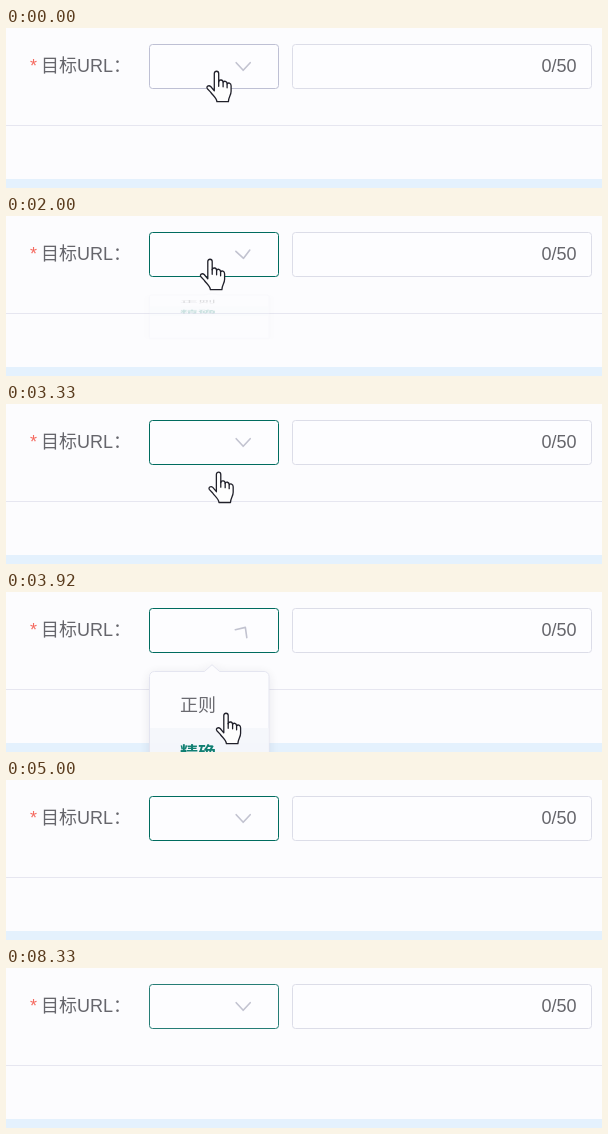
An HTML page for the animation above (8.41 s loop, 596 px wide and 160 px high).

```html
<!DOCTYPE html>
<html lang="zh-CN">
<head>
<meta charset="utf-8">
<title>目标URL</title>
<style>
  html, body { margin: 0; width: 100%; height: 100%; overflow: hidden; background: #fcfcfe; }
  svg { display: block; width: 596px; height: 160px; }
  text { font: 18px "Liberation Sans", "Noto Sans CJK SC", "Noto Sans CJK", sans-serif; fill: #66666c; }
  .box { fill: #fdfdff; stroke: #dcdde8; }
  .selected { font-weight: 700; fill: #0a7c6e; }
  #panel { filter: drop-shadow(0 2px 6px rgba(0, 0, 20, .09)); }
  #chevron { fill: none; stroke: #c2c3d0; stroke-width: 1.6; stroke-linecap: round; stroke-linejoin: round; }
  #hand { fill: #fefefe; stroke: #20202a; stroke-width: 1.3; stroke-linejoin: round; stroke-linecap: round; }
</style>
</head>
<body>
<svg viewBox="0 0 596 160">
  <rect width="596" height="160" fill="#fcfcfe"/>
  <rect y="97" width="596" height="1" fill="#e6e6f0"/>
  <rect y="151" width="596" height="9" fill="#e4f1fd"/>

  <text x="24" y="44" style="fill:#f56a60">*</text>
  <text x="35" y="44">目标URL：</text>

  <rect id="select" class="box" x="143.5" y="16.5" width="129" height="44" rx="3"/>
  <rect class="box" x="286.5" y="16.5" width="299" height="44" rx="3"/>
  <text x="570.5" y="44" text-anchor="end">0/50</text>
  <path id="chevron" d="M-7 3.8L0 -3.8L7 3.8"/>

  <g id="popup">
    <path id="panel" fill="#fdfdff" stroke="#e4e5f0"
      d="M148.500 79.500H198.500L206 72.500L213.500 79.500H258a5 5 0 0 1 5 5V300H143.500V84.500a5 5 0 0 1 5 -5Z"/>
    <rect id="hover" x="144" width="118.500" height="49" fill="#f5f7fb"/>
    <text x="174" y="120">正则</text>
    <text class="selected" x="174" y="170">精确</text>
  </g>

  <g id="hand">
    <path d="M8.200 20.500V3.200C8.200 .2 12.600 .2 12.600 3.200V11.500C13 9 17 9 17 12.200C17.800 10.200 21 10.700 21 13.600C22 12 25 12.600 25 15.500V21C25 25 22.500 26.500 22.300 31.300H10.800C10.500 27.500 6.500 25 4.500 21.800L1.300 18.400C-.3 16.300 2.600 14.400 4.600 16.200Z"/>
    <path fill="none" d="M12.600 11V16M17 12.500V16.500M21 14V17.500"/>
  </g>
</svg>
<script>
const LOOP = 8410, STEP = 1000 / 12, FADE = 300;
const el = id => document.getElementById(id);
const clamp = v => Math.min(1, Math.max(0, v));
const mix = (a, b, k) => a + (b - a) * k;
const mixColor = (a, b, k) => `rgb(${a.map((v, i) => Math.round(mix(v, b[i], k)))})`;

function bezier(x1, y1, x2, y2) {
  const at = (a, b, u) => 3 * a * u * (1 - u) ** 2 + 3 * b * u * u * (1 - u) + u ** 3;
  return x => {
    let lo = 0, hi = 1;
    for (let i = 0; i < 24; i++) {
      const mid = (lo + hi) / 2;
      if (at(x1, x2, mid) < x) lo = mid; else hi = mid;
    }
    return at(y1, y2, lo);
  };
}
const ease = bezier(.25, .1, .25, 1);
const zoom = bezier(.23, 1, .32, 1);

// Opening and closing moments of the list
const sessions = [[175, 1225], [1986, 2890], [3765, 4560]];
const firstHovered = [[600, 1800], [3990, 4100]];

// Fingertip: time, x, y
const path = [
  [0, 210.5, 43], [330, 210.5, 43], [1000, 192, 112], [1250, 192, 112],
  [1740, 204, 44], [1920, 204, 43], [2040, 204, 43], [2410, 212, 172],
  [2750, 212, 172], [2833, 211, 155], [2960, 211, 150], [3490, 213, 46],
  [3740, 213, 46], [3917, 220, 121], [4320, 224, 172], [4570, 224, 172],
  [4750, 290, 130], [4990, 364, 175]
];

const HOVERED = [190, 192, 212], FOCUSED = [0, 108, 95], BLURRED = [190, 192, 212];

function openness(t, curve) {
  const [open, close] = sessions.findLast(s => t >= s[0]) || [Infinity, Infinity];
  return t < close ? curve(clamp((t - open) / FADE)) : 1 - curve(clamp((t - close) / FADE));
}

function fingertip(t) {
  const i = path.findIndex(p => p[0] > t);
  if (i < 0) return [700, 300];
  const [t0, x0, y0] = path[i - 1], [t1, x1, y1] = path[i];
  const k = (t - t0) / (t1 - t0), s = k * k * (3 - 2 * k);
  return [mix(x0, x1, s), mix(y0, y1, s)];
}

function draw(t) {
  // Before the first opening the list is fully closed
  const shown = t < sessions[0][0] ? 0 : openness(t, zoom);
  el("popup").setAttribute("transform", `translate(0 ${79 * (1 - shown)}) scale(1 ${shown})`);
  el("popup").style.opacity = shown;
  el("popup").style.display = shown > .005 ? "" : "none";

  const inFirst = firstHovered.some(([a, b]) => t >= a && t < b);
  el("hover").setAttribute("y", inFirst ? 89 : 138);

  const turn = 180 * (1 - openness(t, ease));
  el("chevron").setAttribute("transform", `translate(237.2 38.5) rotate(${turn})`);

  el("select").style.stroke = t < 4000
    ? mixColor(HOVERED, FOCUSED, ease(clamp((t - 130) / 200)))
    : mixColor(FOCUSED, BLURRED, .2 * clamp((t - 8090) / 240));

  const [x, y] = fingertip(t);
  el("hand").setAttribute("transform", `translate(${x - 10.4} ${y - .7})`);
}

const start = performance.now();
function tick() {
  const t = (performance.now() - start) % LOOP;
  // The screen refreshes twelve times a second
  draw(Math.floor((t + 4) / STEP) * STEP);
  requestAnimationFrame(tick);
}
draw(0);
requestAnimationFrame(tick);
</script>
</body>
</html>
```
